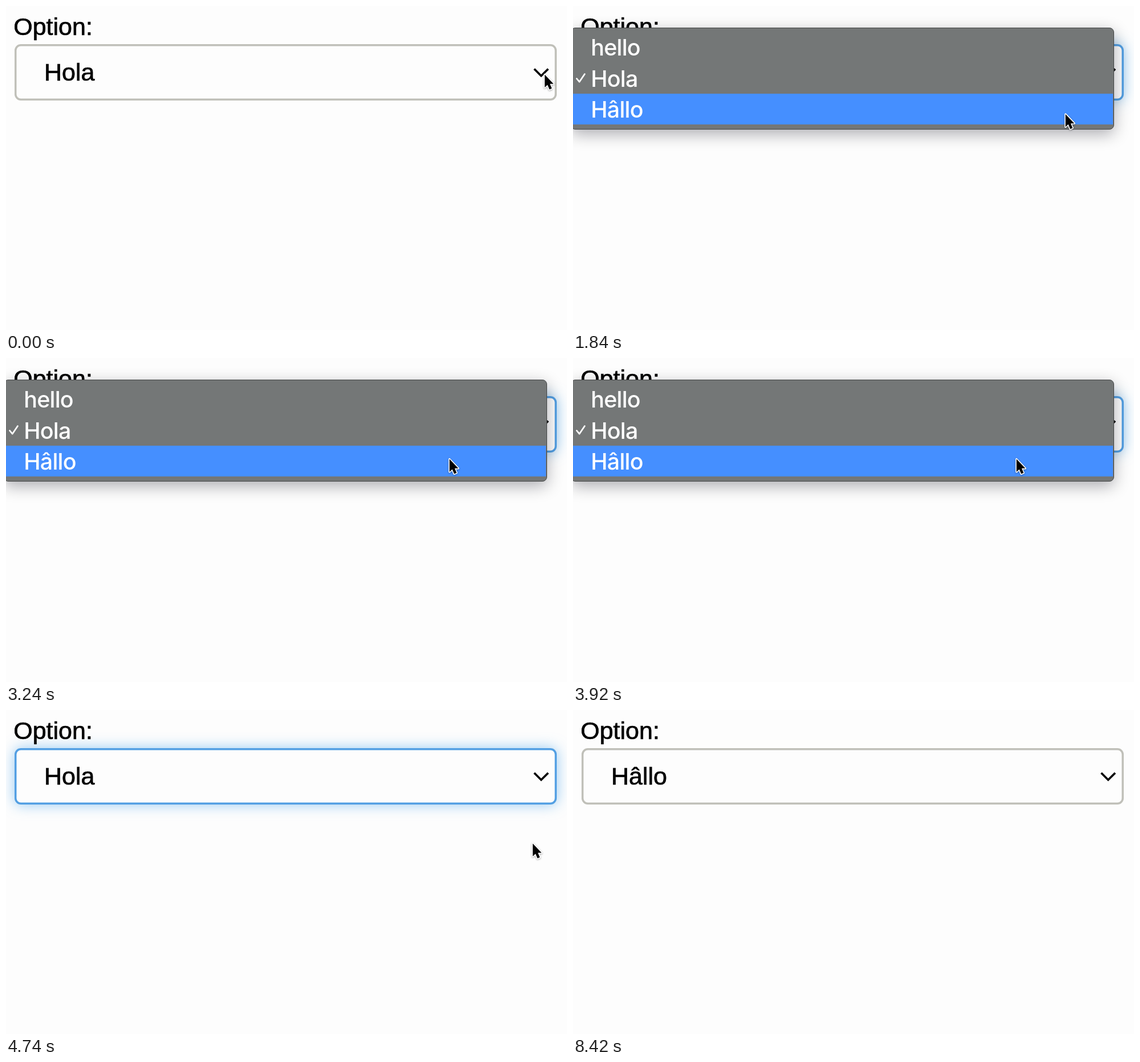
An HTML page that plays this animation: 984x569 px, repeating every 9.74 s.

```html
<!DOCTYPE html>
<html lang="en">
<head>
<meta charset="utf-8">
<title>Select menu</title>
<style>
  html, body { margin: 0; width: 100%; height: 100%; overflow: hidden; background: #fdfdfd; }
  #stage { position: absolute; left: 0; top: 0; width: 984px; height: 569px; overflow: hidden; }
  #stage div, svg { position: absolute; box-sizing: border-box; }
  .layer { left: 0; top: 0; width: 984px; height: 569px; overflow: hidden; }
  .field { left: 15px; top: 67px; width: 951px; height: 99px; border-radius: 11px; background: #fdfdfd;
    box-shadow: inset 0 0 0 3.5px #c0c0b9; }
  #glow { box-shadow: inset 0 0 0 3.5px #529fe3, 0 0 24px rgba(82, 168, 236, .6); }
  #menu { left: -4px; top: 37.5px; width: 953px; height: 179px; border-radius: 8px; background: #747777;
    border: 1px solid #454747; box-shadow: 0 8px 28px rgba(0, 0, 20, .32); }
  #row { left: -1px; width: 951px; height: 54.4px; background: #458fff; }
  .page text { font: 43px "Liberation Sans", Arial, sans-serif; fill: #000; stroke: #000; stroke-width: .7px; }
  .items text { font: 500 39.5px Inter, sans-serif; letter-spacing: -.8px; fill: #fff; }
  #cursor { left: 0; top: 0; overflow: visible; filter: drop-shadow(0 1.5px 1.5px rgba(0, 0, 0, .35)); }
</style>
</head>
<body>
<div id="stage">
  <div class="field"></div>
  <div class="field" id="glow"></div>
  <svg class="layer page" viewBox="0 0 984 569">
    <text x="13.2" y="51.3">Option:</text>
    <text id="value" x="67" y="131">Hola</text>
    <path d="M926.5 110.5 938.7 122.7 951 110.5" fill="none" stroke="#000" stroke-width="3.7"/>
  </svg>
  <div class="layer" id="popup">
    <div id="menu"><div id="row"></div></div>
    <svg class="layer items" viewBox="0 0 984 569">
      <path d="M6.5 127.5 11.2 133.2 20.5 119.5" fill="none" stroke="#fff" stroke-width="2.7" stroke-linecap="round" stroke-linejoin="round"/>
      <text x="31.2" y="87">hello</text>
      <text x="31.2" y="141.5">Hola</text>
      <text x="31.2" y="195.7">Hâllo</text>
    </svg>
  </div>
  <svg id="cursor" width="24" height="36" viewBox="0 0 24 36">
    <path d="M.9 2.5V25L5.8 20.4 9.2 28.6 13.4 26.8 10 18.8H16.4Z" fill="#000" stroke="#fff" stroke-width="3.2" stroke-linejoin="round" paint-order="stroke"/>
  </svg>
</div>
<script>
const LOOP = 9740;
const ROW_TOP = 99.5, ROW_H = 54.4;
const OPEN = 1120, PICK = 4040, FADE = 4260, CLOSED = 4620, COMMIT = 4800, HIDE = 6160;

// pointer moves: start, end, and where each one arrives
const home = { x: 944, y: 118 };
const moves = [
  { from: 20, to: 440, x: 939, y: 113 },
  { from: 1420, to: 2300, x: 780, y: 222 },
  { from: 3060, to: 3240, x: 777, y: 175 },
  { from: PICK, to: 4740, x: 923, y: 232 },
  { from: 5020, to: 5620, x: 880, y: 342 },
  { from: 6020, to: HIDE, x: 815, y: 283 }
];

const $ = id => document.getElementById(id);
const [glow, value, popup, row, cursor] = ['glow', 'value', 'popup', 'row', 'cursor'].map($);
const ramp = (t, a, b) => Math.min(1, Math.max(0, (t - a) / (b - a)));
const easeOut = k => Math.sin(k * Math.PI / 2);

// steady sideways, slowing vertically, so each move bends like a hand
function pointer(t) {
  return moves.reduce((p, m) => {
    const k = ramp(t, m.from, m.to);
    return { x: p.x + (m.x - p.x) * k, y: p.y + (m.y - p.y) * easeOut(k) };
  }, home);
}

function draw(t) {
  const { x, y } = pointer(t);
  cursor.style.transform = `translate(${x}px, ${y}px)`;
  cursor.style.visibility = t < HIDE ? 'visible' : 'hidden';

  glow.style.opacity = ramp(t, 1100, 1220) * (1 - ramp(t, 4780, 4920));
  value.textContent = t < COMMIT ? 'Hola' : 'Hâllo';

  popup.style.opacity = t < OPEN ? 0 : 1 - ramp(t, FADE, CLOSED);
  const index = t >= PICK ? 1 : Math.floor((y - ROW_TOP) / ROW_H);
  row.style.visibility = Math.abs(index) <= 1 ? 'visible' : 'hidden';
  row.style.top = ROW_TOP + index * ROW_H - 38.5 + 'px';
}

const start = performance.now();
function tick() {
  draw((performance.now() - start) % LOOP);
  requestAnimationFrame(tick);
}
tick();
</script>
</body>
</html>
```
